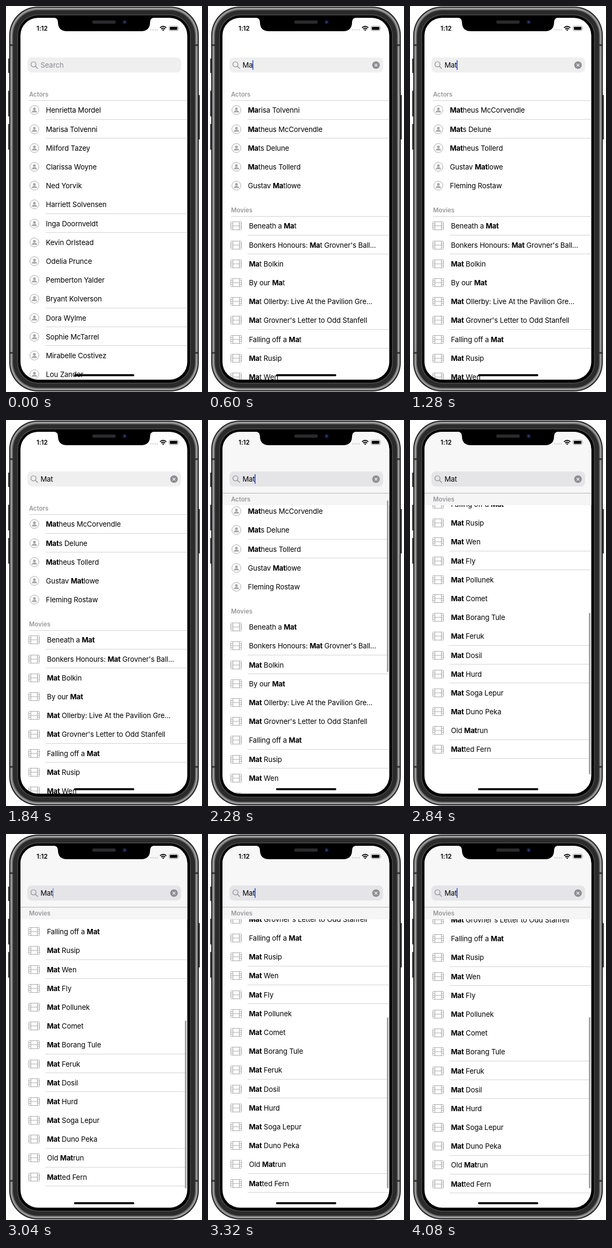
These frames come from a looping animation (366 px wide and 720 px high, 4.12 s). An HTML page:

```html
<!DOCTYPE html>
<html lang="en">
<head>
<meta charset="utf-8">
<title>Search list</title>
<style>
html, body { margin: 0; width: 100%; height: 100%; overflow: hidden; background: #fff; }
svg { display: block; width: 366px; height: 720px; }
text { font-family: Inter, "Open Sans", sans-serif; white-space: pre; }
.row { font-size: 13.2px; letter-spacing: -.12px; fill: #000; }
.row tspan { font-weight: 700; letter-spacing: -.25px; }
.head { font-size: 11.4px; font-weight: 600; fill: #98989b; }
.icon { fill: none; stroke: #a8a8aa; }
.solid { fill: #a8a8aa; stroke: none; }
</style>
</head>
<body>
<svg viewBox="0 0 366 720" xmlns="http://www.w3.org/2000/svg">
  <defs>
    <clipPath id="screen"><rect x="27" y="22" width="311.5" height="675" rx="33"/></clipPath>
    <g id="person">
      <circle class="icon" cx="53" r="8.4"/>
      <circle class="solid" cx="53" cy="-2.2" r="2.6"/>
      <path class="solid" d="M48 4.6c0-2.6 2-3.8 5-3.8s5 1.2 5 3.8z"/>
    </g>
    <g id="film">
      <rect class="icon" x="42.5" y="-7.5" width="20" height="15" rx="1"/>
      <path class="icon" d="M46.5-7.5v15M58.5-7.5v15M46.5 0h12M42.5-3.7h4M42.5 0h4M42.5 3.7h4M58.5-3.7h4M58.5 0h4M58.5 3.7h4"/>
    </g>
  </defs>

  <g fill="#3a3a3a">
    <rect x="4" y="98" width="3" height="27" rx="1"/>
    <rect x="4" y="158" width="3" height="48" rx="1"/>
    <rect x="4" y="220" width="3" height="48" rx="1"/>
    <rect x="359" y="166" width="3" height="83" rx="1"/>
  </g>
  <g id="body"></g>
  <path d="M7 73h6M353 73h6M7 647h6M353 647h6" stroke="#333" stroke-width="3"/>

  <g clip-path="url(#screen)">
    <rect x="27" y="22" width="312" height="676" fill="#fff"/>
    <g id="list"></g>
    <g id="nav">
      <rect x="27" y="22" width="312" height="115" fill="#f7f7f8"/>
      <rect x="27" y="136" width="312" height="1" fill="#b4b4b6"/>
    </g>
    <g id="pinned"></g>
    <rect id="bar" x="334" width="3" rx="1.5" fill="#a3a3a5"/>
    <rect id="field" x="40" y="96" width="287" height="28" rx="8"/>
    <g fill="none" stroke="#8a8a8e" stroke-width="1.2" stroke-linecap="round">
      <circle cx="51.3" cy="108.8" r="4.8"/><path d="M55 112.5l4 4"/>
    </g>
    <text id="query" x="64.5" y="115" font-size="13.2" letter-spacing="-.1"></text>
    <rect id="caret" y="101" width="1.8" height="18" fill="#3d5fe0"/>
    <g id="clear">
      <circle cx="313.7" cy="110.3" r="7" fill="#8e8e93"/>
      <path d="M311.2 107.8l5 5m0-5l-5 5" stroke="#fff" stroke-width="1.2"/>
    </g>
    <text x="57" y="46" font-size="11.8" font-weight="600" letter-spacing="-.1">1:12</text>
    <path d="M269.5 44.5h14" stroke="#c4c4c4" stroke-width="2" stroke-dasharray="2 2"/>
    <path d="M287.6 40.6q5.9-5.4 11.8 0M289.8 43q3.7-3.2 7.4 0" fill="none" stroke="#000" stroke-width="1.9"/>
    <path d="M291.5 44.6q2-1.5 4 0l-2 2z"/>
    <rect x="304.5" y="37.5" width="17" height="8.4" rx="2.4" fill="none" stroke="#999"/>
    <rect x="306" y="39" width="14" height="5.4" rx="1.2"/>
    <path d="M322.8 40.2q1.4 1.5 0 3z" fill="#999"/>
    <rect x="127" y="686.8" width="112.5" height="3.8" rx="1.9"/>
  </g>

  <path d="M87 21.5q10 0 10 8.5q0 17 17 17h138q17 0 17-17q0-8.5 10-8.5z"/>
  <rect x="161" y="27" width="44" height="6" rx="3" fill="#2a2a2c"/>
  <circle cx="221.5" cy="30" r="4" fill="#11162c"/>
  <circle cx="221.5" cy="30" r="1.7" fill="#2b468c"/>
</svg>

<script>
const LOOP = 4120, STEP = 40, ROW = 35.193, TOP = 176, GAP = 40.035;
const $ = id => document.getElementById(id);
const clamp = v => Math.max(0, Math.min(1, v));
const frac = v => v - Math.floor(v);

const people = ["Henrietta Mordel", "Marisa Tolvenni", "Milford Tazey", "Clarissa Woyne",
  "Ned Yorvik", "Harriett Solvensen", "Inga Doornveldt", "Kevin Orlstead", "Odelia Prunce",
  "Pemberton Yalder", "Bryant Kolverson", "Dora Wylme", "Sophie McTarrel",
  "Mirabelle Costivez", "Lou Zander"];
const found = ["Matheus McCorvendle", "Mats Delune", "Matheus Tollerd", "Gustav Matlowe",
  "Fleming Rostaw"];
const movies = ["Beneath a Mat", "Bonkers Honours: Mat Grovner's Ball...", "Mat Bolkin",
  "By our Mat", "Mat Ollerby: Live At the Pavilion Gre...",
  "Mat Grovner's Letter to Odd Stanfell", "Falling off a Mat", "Mat Rusip", "Mat Wen",
  "Mat Fly", "Mat Pollunek", "Mat Comet", "Mat Borang Tule", "Mat Feruk", "Mat Dosil",
  "Mat Hurd", "Mat Soga Lepur", "Mat Duno Peka", "Old Matrun", "Matted Fern"];

// Nested rounded rings from the steel rim in to the bezel.
const ring = (inset, color) =>
  `<rect x="${6 + inset}" y="${1 + inset}" width="${354 - 2 * inset}" height="${718 - 2 * inset}"`
  + ` rx="${54 - inset}" fill="${color}"/>`;
$("body").innerHTML = ring(0, "#111") + ring(1.5, "#777") + ring(3, "#a2a2a2")
  + ring(5, "#6a6a6a") + ring(7, "#2b2b2b") + ring(15, "#555") + ring(16.3, "#000");

function sections(q) {
  if (!q) return [{ title: "Actors", items: people, icon: "person", x: 74.5, y: TOP }];
  const actors = q === "Mat" ? found
    : people.concat(found).filter(n => n.includes(q)).slice(0, 5);
  return [
    { title: "Actors", items: actors, icon: "person", x: 74.5, y: TOP },
    { title: "Movies", items: movies, icon: "film", x: 76.5, y: TOP + actors.length * ROW + GAP }
  ];
}

// Hairlines are thinner than a pixel, so they show only at some offsets.
function hairline(x, y) {
  const f = frac(y);
  return f > .06 && f < .52
    ? `<rect x="${x}" y="${Math.floor(y)}" width="${339 - x}" height="1" fill="#d2d2d4"/>` : "";
}

const header = (title, y) => `<text class="head" x="43" y="${y}">${title}</text>`;
const bold = (s, q) => q ? s.replace(q, `<tspan>${q}</tspan>`) : s;

function listMarkup(secs, q, off) {
  let out = "";
  for (const s of secs) {
    const top = s.y - off;
    out += header(s.title, Math.round(top - 7)) + hairline(43, top + .1);
    s.items.forEach((name, i) => {
      const y = top + i * ROW;
      if (y < 90 || y > 720) return;
      const mid = Math.round(y + 18.4);
      out += `<use href="#${s.icon}" y="${mid}"/>`
        + `<text class="row" x="${s.x}" y="${mid + 5}">${bold(name, q)}</text>`
        + hairline(74, y + ROW);
    });
  }
  return out;
}

function pinnedMarkup(secs, off) {
  if (off < 17) return "";
  const current = secs.filter(s => s.y - off <= 160).pop() || secs[0];
  return `<rect x="27" y="137" width="312" height="22" fill="#f5f5f6"/>` + header(current.title, 152);
}

// A drag, a pause, then a flick that overshoots and springs back.
function scrollAt(t) {
  if (t < 2120) return 0;
  if (t < 2600) return 130 * Math.pow(clamp((t - 2120) / 240), 4.15);
  if (t < 2840) return 214.4 + 250.2 * (1 - Math.pow(1 - (t - 2600) / 240, 2));
  const s = (t - 2840) * .0113;
  return 426.4 + 38.2 * (1 + s) * Math.exp(-s);
}

function caretAt(t) {
  if (t < 40) return 0;
  if (t < 1680) return 1;
  const p = (t - 1680) % 960;
  return p < 360 ? clamp(1 - (p + 32) / 192) : clamp((p - 320) / 160);
}

const prefix = (t, times) => "Mat".slice(0, times.filter(at => t >= at).length);

function draw(t) {
  const typed = prefix(t, [40, 480, 960]), q = prefix(t, [80, 560, 1120]);
  const off = scrollAt(t), secs = sections(q), barTop = 138.6 + .476 * off;

  $("list").innerHTML = listMarkup(secs, q, off);
  $("pinned").innerHTML = pinnedMarkup(secs, off);
  $("nav").setAttribute("opacity", clamp(off / 17));
  $("field").setAttribute("fill", off < 17 ? "#efeff0" : "#e5e5e7");

  $("bar").setAttribute("y", barTop);
  $("bar").setAttribute("height", Math.min(320, 661 - barTop));
  $("bar").setAttribute("opacity", clamp((t - 2120) / 80));

  const label = $("query");
  label.textContent = typed || "Search";
  label.setAttribute("fill", typed ? "#000" : "#8a8a8e");
  $("caret").setAttribute("x", 64.5 + label.getComputedTextLength() - .8);
  $("caret").setAttribute("opacity", caretAt(t));
  $("clear").setAttribute("opacity", typed ? 1 : 0);
}

const start = performance.now();
let last = -1;
function tick() {
  const t = Math.floor((performance.now() - start) % LOOP / STEP) * STEP;
  if (t !== last) draw(last = t);
  requestAnimationFrame(tick);
}
tick();
</script>
</body>
</html>
```
